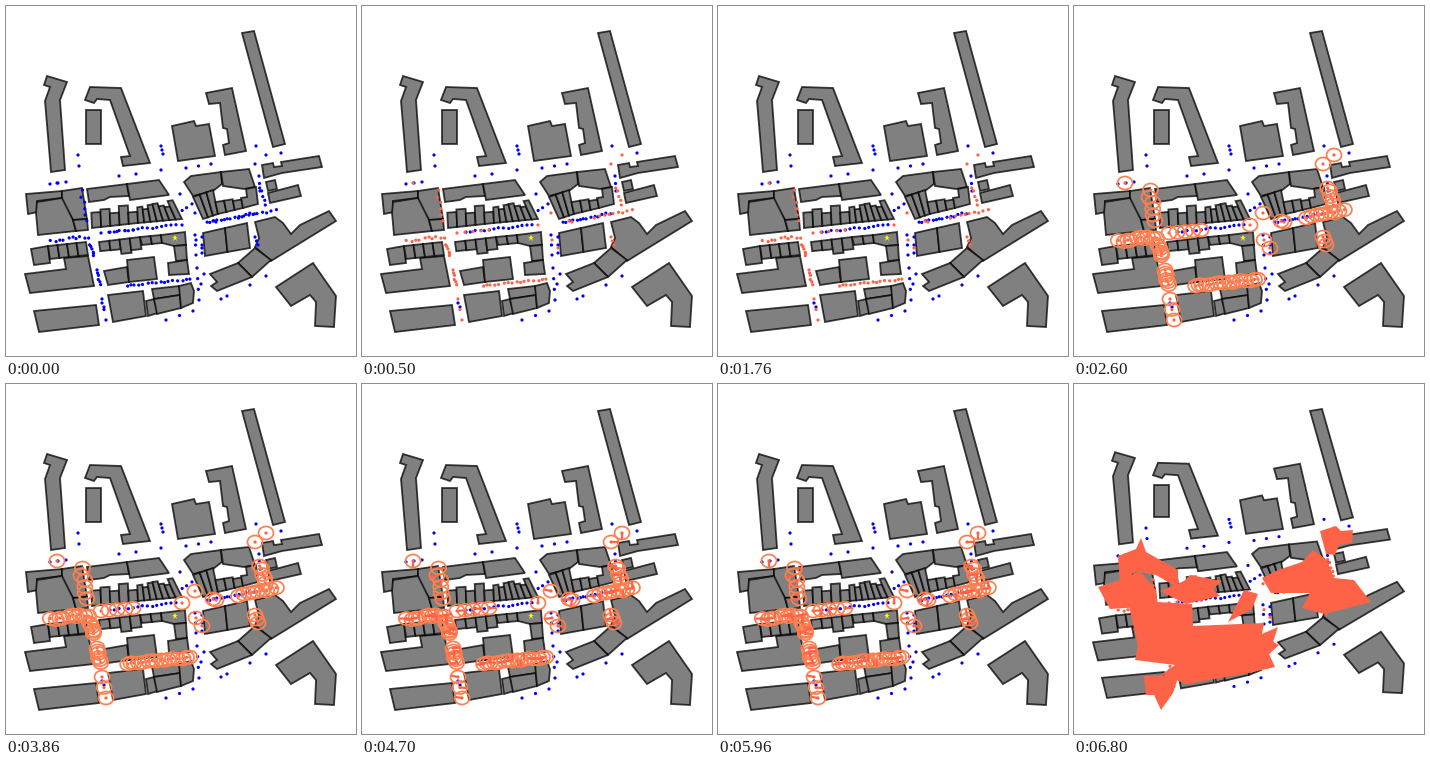
Write a matplotlib script that moves like this. It is 350 px wide and 350 px high and loops after 8 s.

```python
import numpy as np
import matplotlib.pyplot as plt
from matplotlib.animation import FuncAnimation
from matplotlib.collections import EllipseCollection, LineCollection
from matplotlib.patches import Polygon

SIZE, STEP, LOOP = 350, 100, 8000
SQUASH, SHIFT = 0.96, 1  # the last view is slightly flattened
SELECT, CIRCLE, LOOK, VIEW = 500, 2600, 4700, 6800

rng = np.random.default_rng(4)
fig = plt.figure(figsize=(3.5, 3.5), dpi=100, facecolor="white")
ax = fig.add_axes([0, 0, 1, 1])
ax.axis("off")
ax.set_xlim(0, SIZE)
ax.set_ylim(SIZE, 0)


def building(*corners):
    ax.add_patch(Polygon(corners, facecolor="gray", edgecolor=(0, 0, 0, 0.75),
                         linewidth=1.3, joinstyle="miter"))


def row(front_a, front_b, back_b, back_a, houses, ragged=0):
    """Split a block into equal houses, with backs of varying depth."""
    t = np.linspace(0, 1, houses + 1)[:, None]
    front = np.array(front_a) * (1 - t) + np.array(front_b) * t
    back = np.array(back_a) * (1 - t) + np.array(back_b) * t
    for i in range(houses):
        depth = 1 - ragged * rng.random()
        a, b = front[i], front[i + 1]
        building(a, b, b + (back[i + 1] - b) * depth,
                 a + (back[i] - a) * depth)


def street(start, end, count, jitter=0.0):
    """Viewpoints spread evenly along a stretch of street."""
    points = np.linspace(start, end, count)
    return points + rng.normal(0, 1, points.shape) * jitter


def discs(points, width, height, zorder, **style):
    n = len(points)
    return ax.add_collection(EllipseCollection(
        np.full(n, width), np.full(n, height), np.zeros(n), units="xy",
        offsets=points, transOffset=ax.transData, zorder=zorder, **style))


def view(*outline):
    points = [(x, (y - SHIFT) / SQUASH) for x, y in outline]
    return ax.add_patch(Polygon(points, facecolor="tomato", edgecolor="none",
                                zorder=7))


# Outlying buildings
building((41, 70), (61, 76), (54, 94), (59, 164), (45, 166), (39, 95),
         (44, 81), (38, 79))
building((84, 81), (115, 82), (144, 157), (117, 160), (115, 151), (124, 150),
         (104, 94), (91, 93), (88, 97), (79, 94))
building((80, 104), (95, 104), (95, 138), (80, 138))
building((166, 120), (188, 115), (190, 120), (203, 118), (209, 150),
         (172, 155))
building((200, 87), (226, 82), (240, 145), (219, 149), (217, 139), (223, 137),
         (221, 123), (217, 122), (214, 97), (203, 98))
building((236, 27), (248, 25), (279, 138), (267, 141))
building((270, 281), (307, 257), (330, 290), (328, 321), (309, 320),
         (310, 296), (304, 289), (285, 300))
building((28, 305), (90, 299), (93, 319), (33, 326))

# West blocks
building((20, 188), (56, 185), (56, 192), (31, 195), (32, 206), (22, 208))
building((56, 185), (76, 182), (81, 213), (67, 214), (56, 198))
building((31, 196), (56, 192), (67, 214), (70, 225), (32, 229), (30, 207))
building((67, 214), (81, 213), (82, 224), (70, 225))
building((19, 268), (60, 263), (58, 252), (82, 250), (88, 280), (24, 287))
building((25, 243), (42, 240), (44, 257), (28, 259))
row((42, 240), (80, 236), (82, 249), (44, 253), 4)

# Central block around its courtyards
building((81, 183), (121, 178), (123, 190), (104, 191), (98, 194), (83, 196))
building((121, 178), (153, 174), (163, 189), (124, 194))
row((86, 222), (132, 217), (131, 197), (85, 200), 5, 0.5)
row((132, 217), (176, 213), (165, 191), (131, 197), 7, 0.4)
row((93, 236), (134, 231), (136, 247), (95, 251), 4, 0.4)
row((134, 231), (155, 229), (156, 237), (136, 239), 2)
building((155, 229), (179, 226), (180, 239), (168, 240), (156, 237))
building((168, 240), (180, 239), (181, 254), (170, 255))
building((162, 257), (181, 254), (183, 268), (163, 269))
building((98, 265), (121, 261), (123, 276), (102, 279))
building((121, 254), (148, 251), (151, 273), (123, 276))

# Southern block
building((102, 289), (137, 285), (140, 310), (107, 316))
building((140, 295), (148, 293), (152, 307), (142, 310))
building((146, 283), (173, 280), (175, 289), (148, 293))
building((148, 293), (174, 289), (175, 302), (151, 308))
building((173, 280), (185, 277), (188, 285), (187, 297), (175, 302))

# East blocks
building((178, 176), (185, 170), (215, 166), (216, 178), (207, 185),
         (187, 190))
building((215, 166), (243, 163), (249, 181), (238, 183), (217, 180))
row((197, 213), (212, 208), (207, 184), (187, 191), 3)
row((212, 208), (237, 202), (235, 190), (209, 194), 3, 0.3)
building((235, 192), (241, 191), (240, 183), (250, 181), (252, 198),
         (237, 202))
building((256, 159), (267, 157), (268, 161), (276, 160), (275, 156),
         (313, 150), (316, 161), (276, 167), (258, 172))
building((260, 176), (269, 174), (271, 183), (262, 185))
building((262, 187), (292, 179), (295, 190), (264, 197))
row((197, 227), (241, 217), (244, 242), (199, 250), 2)
building((249, 216), (269, 211), (277, 217), (285, 228), (294, 219),
         (323, 205), (330, 215), (265, 255), (249, 241), (253, 232))
building((232, 257), (249, 242), (265, 254), (246, 271))
building((204, 268), (232, 257), (246, 271), (211, 285), (205, 280),
         (211, 276))

# Viewpoints that stay blue
plain = np.vstack([street(*stretch) for stretch in [
    ((44, 178), (60, 176), 3),
    ((72, 149), (73, 160), 2),
    ((113, 170), (130, 168), 2),
    ((155, 140), (157, 148), 3),
    ((155, 164), (174, 188), 2),
    ((180, 162), (205, 158), 3),
    ((250, 140), (275, 147), 2),
    ((104, 226), (170, 219), 15, 0.4),
    ((200, 216), (247, 208), 14, 0.9),
    ((253, 170), (254, 185), 3),
    ((185, 198), (176, 204), 3, 0.6),
    ((189, 229), (190, 249), 3),
    ((196, 231), (196, 247), 3),
    ((191, 262), (193, 294), 4),
    ((198, 268), (195, 278), 2),
    ((160, 314), (187, 305), 3),
    ((215, 293), (221, 290), 2),
    ((244, 279), (260, 270), 2),
    ((96, 297), (98, 301), 2),
]])

# Viewpoints that get selected
selected = np.vstack([street(*stretch) for stretch in [
    ((51, 177), (51, 177), 1),
    ((249, 158), (260, 149), 2),
    ((76, 184), (81, 215), 6, 0.7),
    ((45, 235), (83, 231), 10, 0.8),
    ((84, 238), (88, 250), 6, 0.5),
    ((91, 264), (94, 279), 6, 0.5),
    ((96, 293), (100, 314), 3),
    ((95, 227), (127, 224), 5),
    ((176, 219), (189, 207), 2),
    ((190, 234), (196, 242), 2),
    ((207, 215), (210, 216), 2),
    ((120, 280), (184, 273), 16, 0.6),
    ((255, 181), (259, 199), 5, 0.6),
    ((233, 212), (270, 204), 9, 0.6),
    ((249, 231), (252, 239), 3),
]])

discs(plain, 3.2, 3.2, 3, facecolors="blue", edgecolors="none")
ax.plot(169, 232, "*", color="yellow", markersize=4.5, markeredgewidth=0)
unselected = discs(selected, 3.2, 3.2, 4, facecolors="blue",
                   edgecolors="none")
marked = discs(selected, 3.2, 3.2, 4, facecolors="tomato", edgecolors="none")
rings = discs(selected, 15, 13, 5, facecolors="none", edgecolors="coral",
              linewidths=1.25)

# One sight line per selected viewpoint, mostly along or across the street
angles = np.pi / 2 * rng.integers(0, 4, len(selected))
angles += rng.normal(0, 0.15, len(selected))
angles[:3] = np.pi / 2, 0, np.pi / 2
tips = selected + np.c_[7 * np.cos(angles), 6 * np.sin(angles)]
sights = ax.add_collection(LineCollection(
    np.stack([selected, tips], axis=1), colors="tomato", linewidths=1.6,
    zorder=6))

# Areas seen from the selected viewpoints
views = [
    view((44, 172), (62, 165), (67, 154), (72, 168), (104, 186), (104, 204),
         (82, 191), (62, 187), (46, 199)),
    view((24, 203), (46, 196), (66, 187), (82, 206), (84, 222), (36, 225)),
    view((86, 207), (110, 197), (116, 191), (148, 197), (139, 205),
         (146, 212), (112, 220)),
    view((55, 222), (84, 218), (118, 220), (119, 242), (190, 239), (188, 250),
         (204, 243), (199, 258), (205, 261), (195, 270), (201, 283),
         (170, 290), (112, 300), (88, 290), (101, 281), (61, 276), (64, 262)),
    view((70, 292), (105, 291), (99, 309), (87, 326), (80, 311), (72, 311)),
    view((170, 206), (184, 210), (178, 225), (154, 238), (163, 220)),
    view((246, 147), (262, 142), (267, 147), (279, 146), (278, 159),
         (265, 161), (261, 171), (252, 170)),
    view((188, 194), (204, 186), (228, 178), (239, 166), (253, 176),
         (260, 194), (280, 196), (297, 218), (250, 230), (228, 224),
         (236, 209), (197, 209)),
]


def draw(frame):
    time = frame * STEP
    final = time >= VIEW
    unselected.set_visible(time < SELECT)
    marked.set_visible(time >= SELECT)
    rings.set_visible(CIRCLE <= time < VIEW)
    sights.set_visible(LOOK <= time < VIEW)
    for area in views:
        area.set_visible(final)
    if final:
        ax.set_ylim((SIZE - SHIFT) / SQUASH, -SHIFT / SQUASH)
    else:
        ax.set_ylim(SIZE, 0)
    return []


animation = FuncAnimation(fig, draw, frames=LOOP // STEP, interval=STEP,
                          init_func=lambda: draw(0), repeat=True,
                          repeat_delay=0, blit=False)
plt.show()
```
